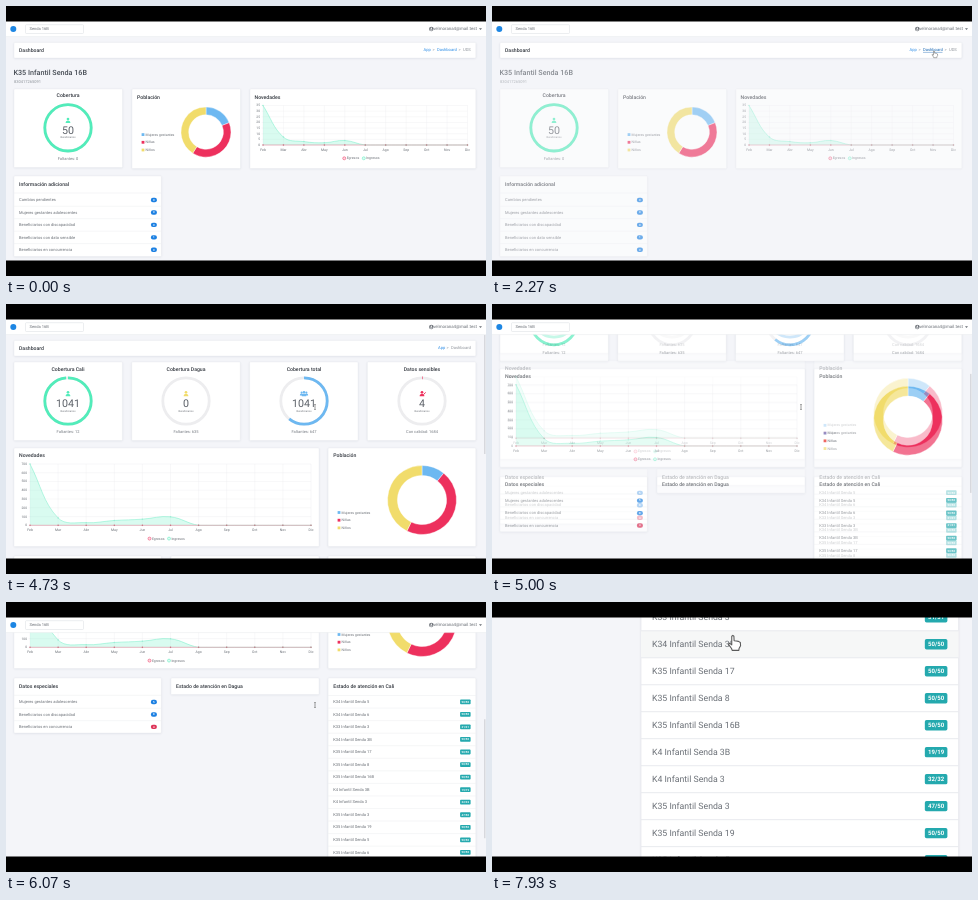
These frames come from a looping animation (480 by 270 pixels, 8 s). An HTML page with a canvas:

```html
<!DOCTYPE html>
<html lang="es">
<head>
<meta charset="utf-8">
<title>Dashboard</title>
<style>
html, body { margin: 0; width: 100%; height: 100%; overflow: hidden; background: #000; }
canvas { display: block; width: 480px; height: 270px; }
</style>
</head>
<body>
<canvas id="stage"></canvas>
<script>
const LOOP = 8000, W = 480, H = 270, TOP = 15.5, BOTTOM = 254.5;
const C = {
  bg: '#f4f5f9', line: '#e8eaee', ink: '#343940', text: '#6a6f76', soft: '#8f949b',
  mint: '#52ecba', red: '#ed305d', yellow: '#f1dc6b', blue: '#6db8f1',
  link: '#2b8ce6', badge: '#1c80e2', teal: '#24a9ae', track: '#ededef'
};
const MONTHS = 'Feb Mar Abr May Jun Jul Ago Sep Oct Nov Dic'.split(' ');
const UNITS = ['K34|5', 'K34|6', 'K33|3', 'K34|3B', 'K35|17', 'K35|8', 'K35|16B', 'K4|3B',
  'K4|3', 'K35|3', 'K35|19', 'K35|5', 'K35|6', 'K35|9', 'K35|2'];
const COUNTS = { 2: '31/31', 7: '19/19', 8: '32/32', 9: '47/50' };
const ROW = 12.55, LIST_L = 322.1, LIST_R = 469.8;

const canvas = document.getElementById('stage');
const dpr = window.devicePixelRatio || 1;
const main = canvas.getContext('2d');
const layer = document.createElement('canvas').getContext('2d');
for (const c of [main, layer]) {
  c.canvas.width = W * dpr;
  c.canvas.height = H * dpr;
}
let g = main;

const clamp = v => Math.max(0, Math.min(1, v));
const span = (t, a, b) => clamp((t - a) / (b - a));
const smooth = u => u * u * (3 - 2 * u);
const inOut = u => u < .5 ? 4 * u ** 3 : 1 - (2 - 2 * u) ** 3 / 2;

function text(s, x, y, size, color = C.text, align = 'left', weight = 400) {
  g.font = `${weight} ${size}px Roboto, sans-serif`;
  g.textRendering = 'geometricPrecision';
  g.textBaseline = 'middle';
  g.textAlign = align;
  g.fillStyle = color;
  g.fillText(s, x, y);
}
const heading = (s, x, y, align) => text(s, x, y, 5.15, C.ink, align, 500);

function rect(x, y, w, h, color) {
  g.fillStyle = color;
  g.fillRect(x, y, w, h);
}
function pill(x, y, w, h, r, color) {
  g.beginPath();
  g.roundRect(x, y, w, h, r);
  g.fillStyle = color;
  g.fill();
}
function disc(x, y, r, color) {
  g.beginPath();
  g.arc(x, y, r, 0, 7);
  g.fillStyle = color;
  g.fill();
}
function line(x1, y1, x2, y2, color = C.line, width = .45) {
  g.beginPath();
  g.moveTo(x1, y1);
  g.lineTo(x2, y2);
  g.strokeStyle = color;
  g.lineWidth = width;
  g.stroke();
}
function card(x1, y1, x2, y2) {
  g.save();
  g.shadowColor = 'rgba(30,40,70,.11)';
  g.shadowBlur = 2.5 * dpr;
  g.shadowOffsetY = .5 * dpr;
  pill(x1, y1, x2 - x1, y2 - y1, .8, '#fff');
  g.restore();
  g.strokeStyle = C.line;
  g.lineWidth = .35;
  g.stroke();
}

function person(x, y, color, s = 1) {
  disc(x, y - 1.3 * s, 1.35 * s, color);
  pill(x - 2.3 * s, y + .3 * s, 4.6 * s, 2.3 * s, [1.6 * s, 1.6 * s, .3, .3], color);
}

function gauge(x, y, title, part, color, value, note, k, icon) {
  heading(title, x, y - 32, 'center');
  g.lineWidth = 2.8;
  g.strokeStyle = C.track;
  g.beginPath();
  g.arc(x, y, 23.2, 0, 7);
  g.stroke();
  if (part) {
    g.strokeStyle = color;
    g.beginPath();
    g.arc(x, y, 23.2, -Math.PI / 2, Math.PI * (2 * part * k - .5));
    g.stroke();
  }
  if (icon === 'group') {
    person(x - 2.4, y - 7.4, color, .75);
    person(x + 2.4, y - 7.4, color, .75);
  }
  person(x, y - 7.4, color);
  if (icon === 'edit') line(x + 1.6, y - 6.4, x + 3.6, y - 8.6, color, 1);
  text(value, x, y + 3.2, 10.7, '#5c6168', 'center');
  text('Beneficiarios', x, y + 9.8, 2.6, C.text, 'center');
  text(note, x, y + 31.3, 4, '#777c83', 'center');
}

function doughnut(x, y, outer, inner, cuts, k) {
  let from = 0;
  [C.blue, C.red, C.yellow].forEach((color, i) => {
    const a = (from * k - 90) * Math.PI / 180, b = (cuts[i] * k - 90) * Math.PI / 180;
    g.beginPath();
    g.arc(x, y, outer, a, b);
    g.arc(x, y, inner, b, a, true);
    g.closePath();
    g.fillStyle = color;
    g.fill();
    g.strokeStyle = '#fff';
    g.lineWidth = .4;
    g.stroke();
    from = cuts[i];
  });
}
function pieLegend(x, y) {
  [['Mujeres gestantes', C.blue], ['Niñas', C.red], ['Niños', C.yellow]].forEach(([s, color], i) => {
    const yy = y + i * 7.7;
    rect(x - 1.4, yy - 1.4, 2.8, 2.8, color);
    text(s, x + 2.6, yy, 3.5);
  });
}

function curve(pts, lo, hi) {
  const n = pts.length;
  const ctrl = pts.map((p, i) => {
    const a = pts[Math.max(0, i - 1)], b = pts[Math.min(n - 1, i + 1)];
    const da = Math.hypot(p[0] - a[0], p[1] - a[1]), db = Math.hypot(b[0] - p[0], b[1] - p[1]);
    const fa = .4 * da / (da + db), fb = .4 * db / (da + db);
    const fit = v => Math.max(lo, Math.min(hi, v));
    const dx = b[0] - a[0], dy = b[1] - a[1];
    return [p[0] - fa * dx, fit(p[1] - fa * dy), p[0] + fb * dx, fit(p[1] + fb * dy)];
  });
  g.moveTo(...pts[0]);
  for (let i = 1; i < n; i++)
    g.bezierCurveTo(ctrl[i - 1][2], ctrl[i - 1][3], ctrl[i][0], ctrl[i][1], ...pts[i]);
}

function chart(x1, y1, x2, y2, values, max, step, k) {
  const px = i => x1 + (x2 - x1) * i / 10, py = v => y2 - (y2 - y1) * v / max;
  for (let v = 0; v <= max; v += step) {
    line(x1 - 1.5, py(v), x2, py(v), '#e9eaec', .35);
    text(v, x1 - 3, py(v), 3.3, C.text, 'right');
  }
  MONTHS.forEach((m, i) => {
    line(px(i), y1, px(i), y2 + 1.5, '#e9eaec', .35);
    text(m, px(i), y2 + 5, 3.5, C.text, 'center');
  });
  const pts = MONTHS.map((m, i) => [px(i), py((values[i] || 0) * k)]);
  g.beginPath();
  curve(pts, y1, y2);
  g.strokeStyle = '#8ff0d2';
  g.lineWidth = .6;
  g.stroke();
  g.lineTo(x2, y2);
  g.lineTo(x1, y2);
  g.fillStyle = 'rgba(82,236,186,.22)';
  g.fill();
  line(x1, y2, x2, y2, '#e08a9c', .6);
  pts.forEach(p => {
    disc(p[0], p[1], .75, '#9decd5');
    disc(p[0], y2, .75, '#c9707f');
  });
  const mid = (x1 + x2) / 2, y = y2 + 13.3;
  [[-21, 'Egresos', C.red], [-1.5, 'Ingresos', C.mint]].forEach(([dx, s, color]) => {
    g.beginPath();
    g.arc(mid + dx, y, 1.5, 0, 7);
    g.fillStyle = color + '30';
    g.fill();
    g.strokeStyle = color;
    g.lineWidth = .5;
    g.stroke();
    text(s, mid + dx + 2.4, y, 3.5);
  });
}

function countRows(x1, x2, y, rows) {
  rows.forEach(([s, n, color], i) => {
    const yy = y + i * 12.45;
    if (i) line(x1, yy - 6.2, x2, yy - 6.2);
    text(s, x1 + 5, yy, 4.06);
    pill(x2 - 10.4, yy - 2.2, 6, 4.4, 2, color || C.badge);
    text(n, x2 - 7.4, yy, 2.8, '#fff', 'center', 700);
  });
}

function unitPage() {
  text('K35 Infantil Senda 16B', 7.5, 67, 7.2, '#454b53', 'left', 500);
  text('830417265091', 8, 75.5, 4, C.soft);
  card(8, 83, 116.5, 161.5);
  gauge(62, 121.8, 'Cobertura', 1, C.mint, '50', 'Faltantes: 0', 1);
  card(126, 83, 234.5, 162.5);
  heading('Población', 131, 91.5);
  pieLegend(137, 128.6);
  doughnut(200, 126, 25, 17.3, [68, 212, 360], 1);
  card(244, 83, LIST_R, 162.5);
  heading('Novedades', 248.5, 91.5);
  chart(257, 99.5, 461.5, 139, [35, 7, 3, 2, 4], 35, 5, 1);
  card(8, 170, 155.3, 250.5);
  heading('Información adicional', 13, 178.3);
  line(8, 187, 155.3, 187);
  countRows(8, 155.3, 194, [['Cambios pendientes', 0], ['Mujeres gestantes adolescentes', 0],
    ['Beneficiarios con discapacidad', 0], ['Beneficiarios con dato sensible', 1],
    ['Beneficiarios en concurrencia', 0]]);
}

function mainPage(k, hover) {
  for (let i = 0; i < 4; i++) card(8 + i * 117.8, 58, 116.4 + i * 117.8, 136.5);
  const y = 97;
  gauge(62, y, 'Cobertura Cali', .987, C.mint, '1041', 'Faltantes: 12', k);
  gauge(180, y, 'Cobertura Dagua', 0, C.yellow, '0', 'Faltantes: 635', k);
  gauge(298, y, 'Cobertura total', .61, C.blue, '1041', 'Faltantes: 647', k, 'group');
  gauge(416, y, 'Datos sensibles', .004, C.red, '4', 'Con calidad: 1684', k, 'edit');
  card(8, 144, 313, 242.5);
  heading('Novedades', 13, 151.8);
  chart(24, 160, 305, 221.3, [700, 84, 30, 55, 70, 97], 700, 100, k);
  card(LIST_L, 144, LIST_R, 242.5);
  heading('Población', 327.3, 151.8);
  pieLegend(333, 208.5);
  doughnut(416, 196, 34.5, 24.6, [39, 206, 360], k);

  card(8, 252, 155.3, 307);
  heading('Datos especiales', 13, 260.2);
  line(8, 269.3, 155.3, 269.3);
  countRows(8, 155.3, 276, [['Mujeres gestantes adolescentes', 5],
    ['Beneficiarios con discapacidad', 8], ['Beneficiarios en concurrencia', 4, '#dd3458']]);
  card(165, 252, 313, 268.5);
  heading('Estado de atención en Dagua', 170, 260.2);
  card(LIST_L, 252, LIST_R, 458);
  heading('Estado de atención en Cali', 327.3, 260.2);
  UNITS.forEach((unit, i) => {
    const [a, b] = unit.split('|'), yy = 275.8 + i * ROW;
    if (i === hover) rect(LIST_L, yy - ROW / 2, LIST_R - LIST_L, ROW, '#f6f7f7');
    line(LIST_L, yy - ROW / 2, LIST_R, yy - ROW / 2);
    text(`${a} Infantil Senda ${b}`, 327.2, yy, 4.06);
    pill(454.1, yy - 2.4, 10.5, 4.8, .8, C.teal);
    text(COUNTS[i] || '50/50', 459.35, yy + .05, 2.8, '#fff', 'center', 700);
  });
}

function crumbs(unit, hover) {
  card(8, 36.5, LIST_R, 52);
  heading('Dashboard', 13, 44);
  const put = (s, x, color) => text(s, x, 44, 4.1, color);
  if (unit) {
    put('App', 417.5, C.link);
    put('>', 426.5, C.soft);
    put('Dashboard', 431, hover ? '#1766b3' : C.link);
    put('>', 452.4, C.soft);
    put('UDS', 457, C.soft);
    if (hover) line(431, 46.4, 450.5, 46.4, '#1766b3', .4);
  } else {
    put('App', 432, C.link);
    put('>', 440.6, C.soft);
    put('Dashboard', 445, C.soft);
  }
}

function topBar() {
  rect(0, 15, W, 15.5, '#fff');
  line(0, 30.6, W, 30.6, '#e6e8ed', .5);
  disc(7.3, 23, 3, '#1d86e3');
  g.beginPath();
  g.roundRect(19.5, 18.7, 58, 8.8, .8);
  g.strokeStyle = '#d9dce1';
  g.lineWidth = .5;
  g.stroke();
  text('Senda 16B', 23.5, 23.2, 4.06);
  disc(425.3, 23, 2.2, '#6a6f76');
  disc(425.3, 22.3, .75, '#fff');
  pill(424, 23.4, 2.6, 1, .5, '#fff');
  text('velmorana4@mail.test', 471, 23.2, 4.4, C.text, 'right');
  g.beginPath();
  g.moveTo(473, 22.2);
  g.lineTo(476, 22.2);
  g.lineTo(474.5, 23.9);
  g.fillStyle = C.text;
  g.fill();
}

const PATH = [[0, 215, 262], [870, 147, 202], [930, 147, 202], [1730, 442, 44.8], [2650, 442, 44.8],
  [3700, 309, 103], [6650, 309, 103], [6870, 311.5, 104.5], [6950, 311.5, 104.5], [7400, 364.8, 105.1],
  [LOOP, 364.8, 105.1]];

function pointer(t) {
  const i = PATH.findIndex(p => p[0] > t);
  const [a, x1, y1] = PATH[i - 1], [b, x2, y2] = PATH[i];
  const u = smooth(span(t, a, b));
  return [x1 + (x2 - x1) * u, y1 + (y2 - y1) * u];
}

function shape(points) {
  g.beginPath();
  points.forEach(p => g.lineTo(...p));
  g.closePath();
  g.lineJoin = 'round';
  g.fillStyle = '#fff';
  g.fill();
  g.strokeStyle = '#5a5a5a';
  g.lineWidth = .5;
  g.stroke();
}

function drawPointer(t, x, y) {
  g.save();
  g.translate(x, y);
  const hand = t < 2700 ? x > 430 : t > 6900 && x > 323;
  if (hand) {
    shape([[-.5, .3], [0, -.1], [.5, .3], [.6, 2.4], [1.6, 2.5], [2.6, 2.7], [3.5, 3.2], [3.6, 4.7],
      [2.9, 6], [2.8, 6.9], [-.3, 6.9], [-.6, 6], [-2, 4.1], [-1.6, 3.5], [-.5, 4.3]]);
  } else if (t > 3650 && t < 6650) {
    line(0, -2.4, 0, 2.4, '#555', .6);
    line(-.9, -2.5, .9, -2.5, '#555', .5);
    line(-.9, 2.5, .9, 2.5, '#555', .5);
  } else {
    shape([[0, 0], [0, 4.9], [1.1, 3.9], [1.9, 5.7], [2.7, 5.3], [1.9, 3.6], [3.4, 3.5]]);
  }
  g.restore();
}

const scrollAt = t =>
  176 * (1 - (1 - span(t, 4800, 5470)) ** 1.68) + 28.3 * smooth(span(t, 6620, 6860));

// Draws into a side layer and lays it over the stage with the given opacity.
function blend(alpha, draw) {
  if (alpha <= 0) return;
  if (alpha >= 1) return draw();
  layer.setTransform(1, 0, 0, 1, 0, 0);
  layer.clearRect(0, 0, W * dpr, H * dpr);
  layer.setTransform(main.getTransform());
  g = layer;
  draw();
  g = main;
  g.save();
  g.setTransform(1, 0, 0, 1, 0, 0);
  g.globalAlpha = alpha;
  g.drawImage(layer.canvas, 0, 0);
  g.restore();
}

function paint(t) {
  g = main;
  g.setTransform(dpr, 0, 0, dpr, 0, 0);
  rect(0, 0, W, H, '#000');
  g.save();

  const zoom = 1 + 1.15 * inOut(span(t, 6950, 7900));
  g.translate(472.6, 167.3);
  g.scale(zoom, zoom);
  g.translate(-472.6, -167.3);

  const [x, y] = pointer(t);
  rect(0, 0, W, H, C.bg);
  if (t < 2400) {
    blend(t < 2270 ? 1 : .62 * (1 - span(t, 2330, 2400)), unitPage);
    crumbs(true, x > 431);
  } else {
    const k = 1 - (1 - span(t, 2420, 3420)) ** 4;
    const scroll = scrollAt(t), next = scrollAt(t + 23);
    const hover = t > 6900 && x > LIST_L ? Math.round((y + 3 + scroll - 275.8) / ROW) : -1;
    const page = s => {
      rect(0, 0, W, H, C.bg);
      g.save();
      g.translate(0, -s);
      mainPage(k, hover);
      crumbs(false);
      g.restore();
    };
    blend(span(t, 2400, 2650), () => page(scroll));
    if (next - scroll > .3) blend(.32, () => page(next));
    if (t < 2650) crumbs(false);
    rect(478.2, 31 + scroll * .49, 1.2, 119, '#d0d2d6');
  }
  topBar();
  drawPointer(t, x, y);
  g.restore();

  rect(0, 0, W, TOP, '#000');
  rect(0, BOTTOM, W, H - BOTTOM, '#000');
}

const start = performance.now();
function tick() {
  paint((performance.now() - start) % LOOP);
  requestAnimationFrame(tick);
}
tick();
</script>
</body>
</html>
```
